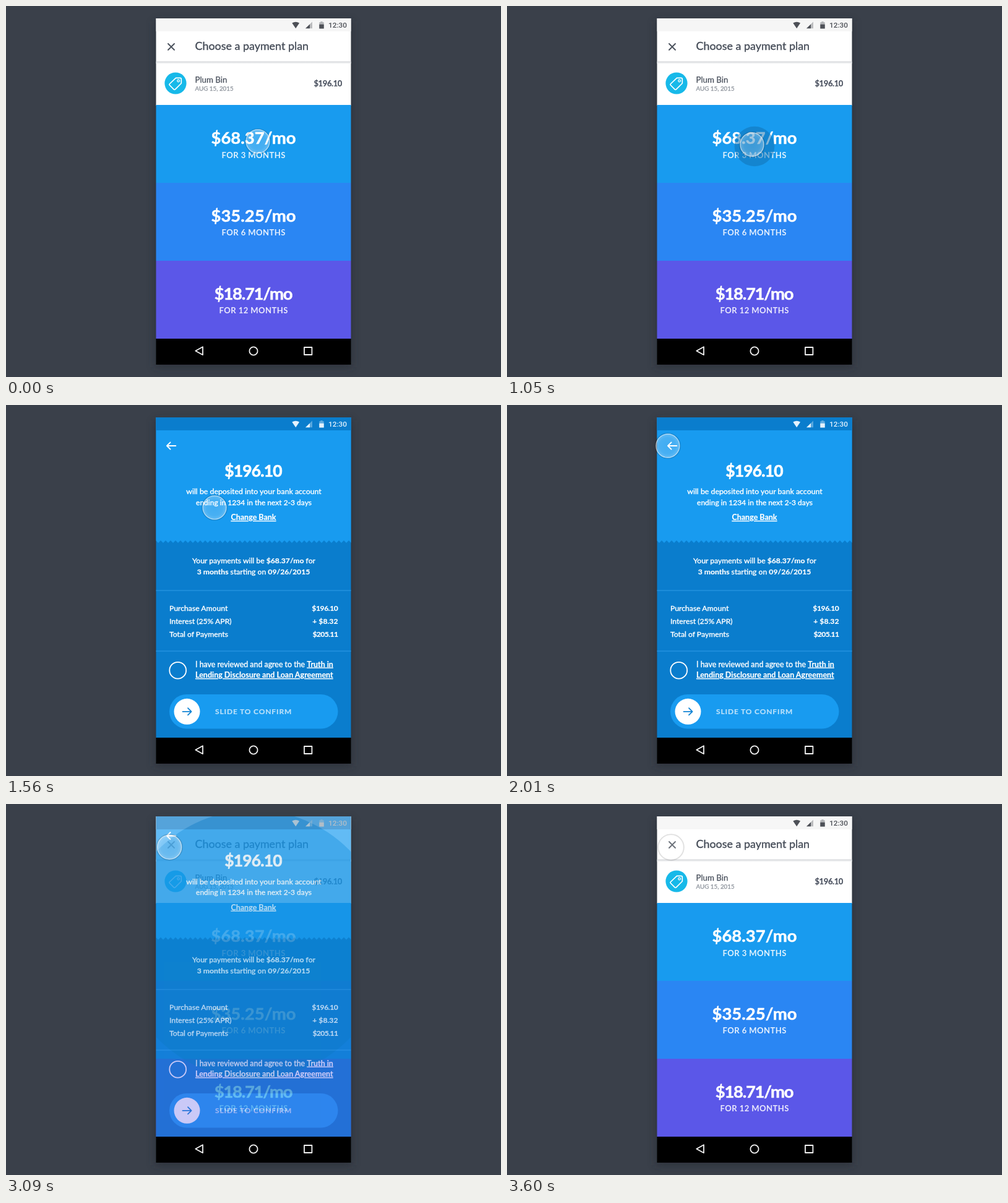
An HTML page for the animation above (3630 ms loop, 800 px wide and 600 px high).

```html
<!DOCTYPE html>
<html lang="en">
<head>
<meta charset="utf-8">
<title>Payment plan</title>
<style>
  html, body { margin: 0; width: 100%; height: 100%; overflow: hidden; background: #3a404a; }
  svg { display: block; width: 800px; height: 600px; }
  text { font-family: Lato, "Open Sans", sans-serif; white-space: pre; }
  .b { font-weight: 700; }
  .u { text-decoration: underline 1px rgba(255, 255, 255, .6); text-underline-offset: 1.5px; }
  .mid { text-anchor: middle; }
  .end { text-anchor: end; }
  .clock { font: 500 11.8px Roboto, sans-serif; }
  .price { font-size: 27.5px; font-weight: 700; fill: #fff; stroke: #fff; stroke-width: .5; }
  .term { font-size: 13.1px; font-weight: 700; letter-spacing: .4px; fill: #fff; fill-opacity: .87; }
  #confirm text { font-size: 12.2px; fill: #fff; stroke: #fff; stroke-width: .2; }
  #confirm .body { stroke-width: .38; }
  #confirm .body .b { stroke-width: .2; }
  .line { fill: none; stroke-linecap: round; stroke-linejoin: round; }
</style>
</head>
<body>
<svg viewBox="0 0 800 600">
  <defs>
    <clipPath id="screen"><rect x="242.5" y="20" width="315" height="518"/></clipPath>
    <filter id="soft" x="-20%" y="-20%" width="140%" height="140%"><feGaussianBlur stdDeviation="7"/></filter>
    <radialGradient id="glass">
      <stop offset="0" stop-color="#fff" stop-opacity=".17"/>
      <stop offset=".7" stop-color="#fff" stop-opacity=".21"/>
      <stop offset="1" stop-color="#fff" stop-opacity=".33"/>
    </radialGradient>
    <linearGradient id="edge" x1="0" y1="0" x2="0" y2="1">
      <stop offset="0" stop-color="#d4d6d9"/><stop offset="1" stop-color="#f4f5f6"/>
    </linearGradient>
    <g id="status">
      <path d="M462.3 27.6Q468.2 23.8 474.1 27.6L468.2 36.3Z"/>
      <path d="M484 36.3L495 25.5V36.3Z" opacity=".35"/>
      <path d="M484 36.3L491 29.4V36.3Z"/>
      <path d="M506.3 26.3H508.4V25H511.6V26.3H513.7V36.5H506.3Z" opacity=".4"/>
      <path d="M506.3 29.8H513.7V36.5H506.3Z"/>
      <text class="clock" x="521" y="35.3" style="font-size:11.8px;fill:inherit;stroke:none">12:30</text>
    </g>
  </defs>

  <rect width="800" height="600" fill="#3a404a"/>
  <rect x="241" y="25" width="318" height="559" fill="#20252d" opacity=".55" filter="url(#soft)"/>

  <g clip-path="url(#screen)">
    <g id="plans">
      <rect x="242" y="20" width="316" height="141" fill="#fff"/>
      <rect x="242" y="20" width="316" height="21" fill="#f6f6f6"/>
      <use href="#status" fill="#4d5057"/>
      <path class="line" d="M262 61L272 71M272 61L262 71" stroke="#4b525d" stroke-width="1.9"/>
      <text x="305.5" y="71" font-size="17.9" fill="#434a56" stroke="#434a56" stroke-width=".35">Choose a payment plan</text>
      <rect x="242" y="89.5" width="316" height="3.5" fill="url(#edge)"/>
      <circle cx="274" cy="125" r="17.6" fill="#17b9e9"/>
      <path class="line" d="M274.5 116.3H281.5Q283.3 116.3 283.3 118V125L273.4 134.9Q272.3 136 271.2 134.9L264.4 128Q263.4 127 264.4 126Z" stroke="#fff" stroke-width="1.7"/>
      <circle cx="278.6" cy="121" r="1.8" fill="none" stroke="#fff" stroke-width="1.3"/>
      <text x="305.5" y="123.5" font-size="13.3" fill="#4a515d" stroke="#4a515d" stroke-width=".25">Plum Bin</text>
      <text x="305.5" y="137.4" font-size="9.8" fill="#8a9099" stroke="#8a9099" stroke-width=".25">AUG 15, 2015</text>
      <text class="b end" x="543" y="129.5" font-size="13" letter-spacing="-.4" fill="#4a515f" stroke="#4a515f" stroke-width=".2">$196.10</text>
      <rect x="242" y="160" width="316" height="126" fill="#189bef"/>
      <rect x="242" y="286" width="316" height="126" fill="#2a86f3"/>
      <rect x="242" y="412" width="316" height="127" fill="#5b57e8"/>
      <text class="price mid" x="400" y="222.8">$68.37/mo</text>
      <text class="term mid" x="400.2" y="245.5">FOR 3 MONTHS</text>
      <text class="price mid" x="400" y="348.8">$35.25/mo</text>
      <text class="term mid" x="400.2" y="370.8">FOR 6 MONTHS</text>
      <text class="price mid" x="399.5" y="474.8" letter-spacing="-1.3">$18.71/mo</text>
      <text class="term mid" x="400.2" y="497">FOR 12 MONTHS</text>
      <circle id="ripple" cx="400" cy="227" fill="#1070b0"/>
    </g>

    <g id="confirm">
      <rect x="242" y="20" width="316" height="519" fill="#0a7dcd"/>
      <path id="panel" fill="#189bf0"/>
      <rect x="242" y="20" width="316" height="21" fill="#0a7dcd"/>
      <use href="#status" fill="#e4f2fd"/>
      <g id="head">
        <path class="line" d="M274.3 66H260M265.6 60.4L260 66L265.6 71.6" stroke="#fff" stroke-width="1.9"/>
        <text class="b mid" x="399.6" y="115.6" style="font-size:26.4px;stroke-width:.7" letter-spacing="-.8">$196.10</text>
        <text class="mid body" x="400.5" y="144" style="font-size:12.35px">will be deposited into your bank account</text>
        <text class="mid body" x="400.5" y="161.5" style="font-size:12px">ending in 1234 in the next 2-3 days</text>
        <text class="mid b u" x="400" y="186" style="font-size:12.5px">Change Bank</text>
      </g>
      <text class="mid body" x="400.5" y="256">Your payments will be <tspan class="b">$68.37/mo</tspan> for</text>
      <text class="mid body" x="400" y="273.5"><tspan class="b">3 months</tspan> starting on <tspan class="b">09/26/2015</tspan></text>
      <path d="M242 300H558M242 398H558" stroke="#2391e0" stroke-width="1.5"/>
      <text class="body" x="264" y="332.6">Purchase Amount</text>
      <text class="body" x="264" y="353.6">Interest (25% APR)</text>
      <text class="body" x="264" y="374.6">Total of Payments</text>
      <text class="b end" x="536.5" y="332.6" letter-spacing="-.45">$196.10</text>
      <text class="b end" x="536.5" y="353.6">+ $8.32</text>
      <text class="b end" x="536.5" y="374.6" letter-spacing="-.6">$205.11</text>
      <circle cx="277.7" cy="429.2" r="13.4" fill="none" stroke="#fff" stroke-width="1.8"/>
      <text class="body" x="306" y="423.6" style="font-size:12.4px">I have reviewed and agree to the <tspan class="b u">Truth in</tspan></text>
      <text class="b u" x="306" y="441" style="font-size:12.5px">Lending Disclosure and Loan Agreement</text>
      <rect x="264" y="468" width="272.5" height="55.5" rx="27.75" fill="#189bf0"/>
      <circle cx="292.5" cy="495.8" r="21" fill="#fff"/>
      <path class="line" d="M285.5 495.8H299.5M294 490.2L299.6 495.8L294 501.4" stroke="#1284d4" stroke-width="1.8"/>
      <text class="b" x="338" y="500.2" style="font-size:12px" letter-spacing=".85" opacity=".7">SLIDE TO CONFIRM</text>
    </g>
  </g>

  <rect x="242.5" y="538" width="315" height="42" fill="#000"/>
  <g class="line" stroke="#f2f2f2" stroke-width="1.8">
    <path d="M306.3 557.7L318 551.2V564.2Z"/>
    <circle cx="400" cy="558" r="6.6"/>
    <rect x="482" y="552" width="12.4" height="12"/>
  </g>

  <g id="touch">
    <circle r="20" fill="none" stroke="#000" stroke-opacity=".13" stroke-width="2.2"/>
    <circle r="19" fill="url(#glass)" stroke="#fff" stroke-opacity=".6" stroke-width="1.3"/>
  </g>
</svg>
<script>
  const LOOP = 3630;
  const el = id => document.getElementById(id);
  const plans = el("plans"), ripple = el("ripple"), confirmView = el("confirm");
  const head = el("head"), panel = el("panel"), touch = el("touch");

  const clamp = v => Math.max(0, Math.min(1, v));
  const smooth = k => k * k * (3 - 2 * k);
  const ramp = (t, from, to) => smooth(clamp((t - from) / (to - from)));
  const show = (node, on) => node.setAttribute("visibility", on ? "visible" : "hidden");

  // time, x, y, scale, sag of the way there
  const path = [
    [0, 407, 219, 1, 0], [1050, 396, 224, 1, 0], [1260, 396, 224, 1, 0],
    [1920, 260.3, 66.3, 1, 10.5], [2150, 259, 65.5, 1, 0],
    [2790, 262.5, 68.5, 1, 0], [3180, 264.4, 70, 1.03, 0], [3600, 265, 70, 1.03, 0]
  ];

  function touchAt(t) {
    let i = 1;
    while (i < path.length - 1 && t > path[i][0]) i++;
    const a = path[i - 1], b = path[i], k = ramp(t, a[0], b[0]);
    const [, x, y, s] = a.map((v, n) => v + (b[n] - v) * k);
    return [x, y + b[4] * Math.sin(Math.PI * k), s];
  }

  // Light panel with a serrated lower edge
  function panelPath(dy) {
    let d = `M242 20V${219 + dy}`;
    for (let x = 242; x < 558; x += 8) d += "l4 4l4 -4";
    return d + "V20Z";
  }

  function draw(t) {
    const back = ramp(t, 2970, 3290);
    const grow = ramp(t, 988, 1308) - back;
    const fade = ramp(t, 1060, 1340) - back;
    const closing = t > 2500;
    const lift = closing ? back : 1 - ramp(t, 1060, 1440);

    ripple.setAttribute("r", Math.max(0, 320 * grow));
    ripple.setAttribute("opacity", closing ? .4 * clamp(grow * 4) : .5);
    confirmView.setAttribute("opacity", clamp(fade));
    show(confirmView, fade > 0);
    show(plans, fade < 1);
    head.setAttribute("transform", `translate(0 ${-45 * lift})`);
    panel.setAttribute("d", panelPath(-11 * lift));

    const [x, y, s] = touchAt(t);
    touch.setAttribute("transform", `translate(${x} ${y}) scale(${s})`);
  }

  const start = performance.now();
  function tick() {
    draw((performance.now() - start) % LOOP);
    requestAnimationFrame(tick);
  }
  draw(0);
  requestAnimationFrame(tick);
</script>
</body>
</html>
```
